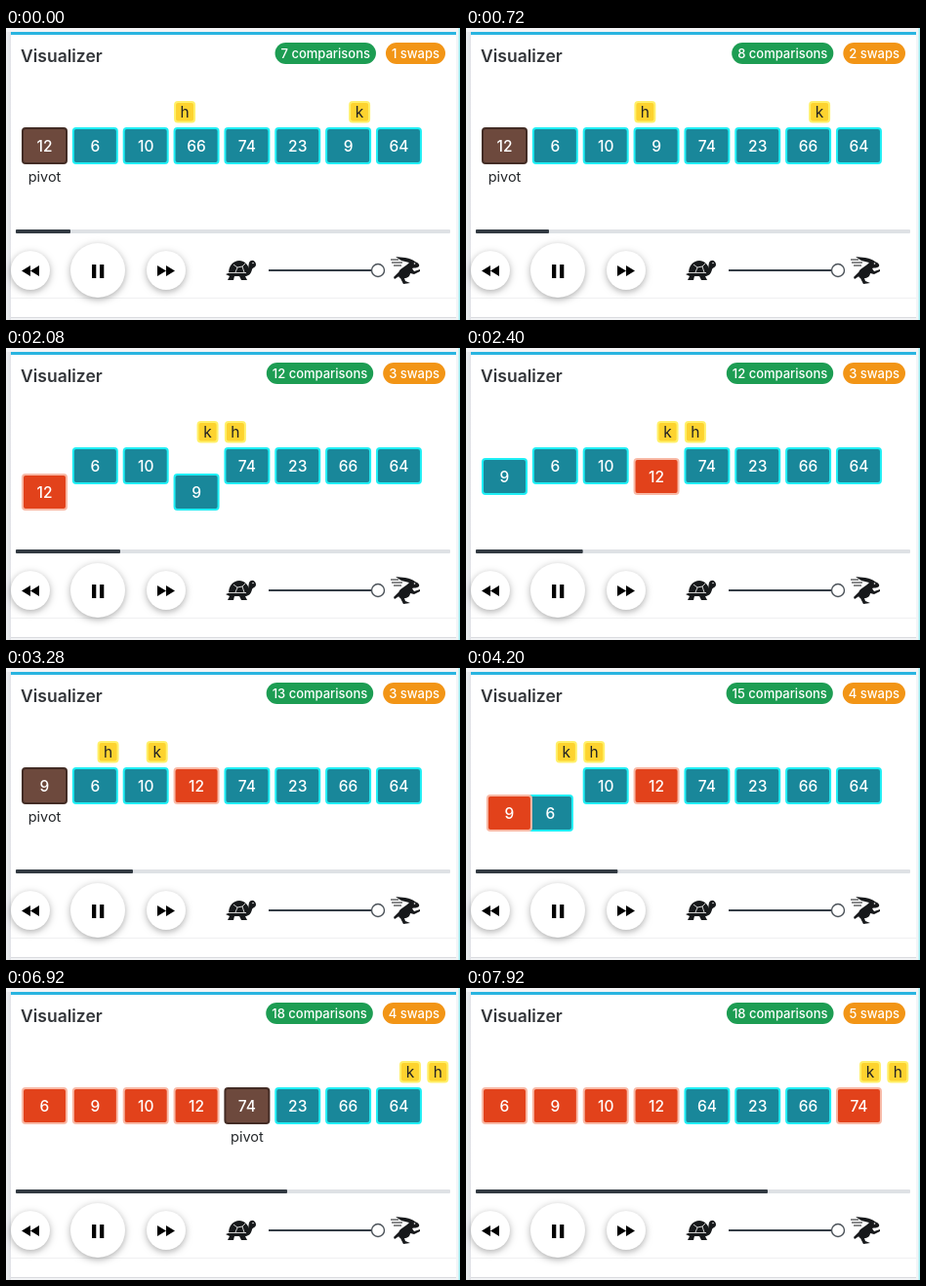
These frames come from a looping animation (465 by 300 pixels, 8000 ms). An HTML page with a canvas:

```html
<!DOCTYPE html>
<html lang="en">
<head>
<meta charset="utf-8">
<title>Quicksort visualizer</title>
<style>
  html, body { margin: 0; width: 100%; height: 100%; overflow: hidden; background: #fff; }
  canvas { display: block; width: 465px; height: 300px; }
</style>
</head>
<body>
<canvas id="stage"></canvas>
<script>
const LOOP = 8000, MOVE = 150, LEG = 200, DROP = 28;
const FONT = 'Inter, Roboto, sans-serif';
const canvas = document.getElementById('stage');
const ctx = canvas.getContext('2d');
const ratio = window.devicePixelRatio || 1;
canvas.width = 465 * ratio;
canvas.height = 300 * ratio;

// Sorting run: times in ms
const values = [12, 6, 10, 66, 74, 23, 9, 64];
const swaps = [[30, 3, 6], [1930, 0, 3], [3980, 0, 1], [7000, 4, 7]];
const compares = [718, 960, 1205, 1450, 1695, 3237, 3485, 3730, 6250, 6500, 6750];
const pivots = [[12, 0, 1930], [9, 2990, 3980], [74, 6000, 7000]];
const sortedAt = { 12: 1930, 9: 3980, 6: 4700, 10: 4950, 74: 7000 };
const hTrack = [[0, 3], [718, 4], [2990, 1], [3237, 2], [6000, 5], [6250, 6], [6500, 7], [6750, 8]];
const kTrack = [[0, 6], [1205, 5], [1450, 4], [1695, 3], [2990, 2], [3730, 1], [6000, 7]];
const progress = [[0, 66], [40, 66], [720, 85], [2080, 117], [2800, 123], [3000, 123],
  [3280, 130], [4660, 168], [5480, 193], [6000, 193], [6920, 288], [7660, 302], [7920, 309], [8000, 309]];

const skins = {
  idle: ['#19879a', '#1feff5'],
  pivot: ['#6d493d', '#432c25'],
  sorted: ['#e2421b', '#f8b9a6']
};

const clamp = x => Math.max(0, Math.min(1, x));
const mix = (a, b, p) => a + (b - a) * p;
const slotX = i => 39.5 + 51.85 * i;

// cubic-bezier(.25, .1, .25, 1)
function ease(x) {
  x = clamp(x);
  let lo = 0, hi = 1;
  for (let i = 0; i < 18; i++) {
    const s = (lo + hi) / 2;
    const bx = 0.75 * s * (1 - s) + s * s * s;
    if (bx < x) lo = s; else hi = s;
  }
  return 0.3 * lo * (1 - lo) ** 2 + 3 * lo * lo * (1 - lo) + lo ** 3;
}

function linear(keys, t) {
  const i = Math.max(1, keys.findIndex(k => k[0] >= t));
  const [t0, a] = keys[i - 1], [t1, b] = keys[i];
  return mix(a, b, clamp((t - t0) / (t1 - t0)));
}

function slide(track, t) {
  let i = track.length - 1;
  while (i > 0 && track[i][0] > t) i--;
  const [start, to] = track[i];
  return i ? mix(track[i - 1][1], to, ease((t - start) / MOVE)) : to;
}

function boxesAt(t) {
  const boxes = values.map((value, i) => ({ value, slot: i, drop: 0 }));
  for (const [start, a, b] of swaps) {
    if (t < start) break;
    const left = boxes.find(o => o.slot === a), right = boxes.find(o => o.slot === b);
    const down = ease((t - start) / LEG);
    const across = ease((t - start - LEG) / LEG);
    const up = ease((t - start - 2 * LEG) / LEG);
    left.slot = across > 0.9999 ? b : mix(a, b, across);
    right.slot = across > 0.9999 ? a : mix(b, a, across);
    left.drop = right.drop = DROP * (down - up);
  }
  return boxes;
}

function text(str, x, y, size, weight, color, align = 'center') {
  ctx.font = `${weight} ${size}px ${FONT}`;
  ctx.textAlign = align;
  ctx.fillStyle = color;
  ctx.fillText(str, x, y);
}

function rect(x, y, w, h, color) {
  ctx.fillStyle = color;
  ctx.fillRect(x, y, w, h);
}

function tile(x, y, w, h, r, fill, stroke, line) {
  ctx.beginPath();
  ctx.roundRect(x, y, w, h, r);
  ctx.fillStyle = fill;
  ctx.fill();
  if (!stroke) return;
  ctx.lineWidth = line;
  ctx.strokeStyle = stroke;
  ctx.stroke();
}

function shape(d, color) {
  ctx.fillStyle = color;
  ctx.fill(new Path2D(d));
}

function lines(d, color, width) {
  ctx.strokeStyle = color;
  ctx.lineWidth = width;
  ctx.stroke(new Path2D(d));
}

function badge(str, right, color) {
  ctx.font = `500 13px ${FONT}`;
  const w = ctx.measureText(str).width + 12;
  tile(right - w, 15, w, 22, 11, color);
  text(str, right - w / 2, 31, 13, 500, '#fff');
  return right - w;
}

function button(x, r) {
  ctx.save();
  ctx.shadowColor = 'rgba(0,0,0,.32)';
  ctx.shadowBlur = 7 * ratio;
  ctx.shadowOffsetY = 2 * ratio;
  ctx.beginPath();
  ctx.arc(x, 249, r, 0, 7);
  ctx.fillStyle = '#fff';
  ctx.fill();
  ctx.restore();
}

function drawCard() {
  rect(0, 0, 465, 300, '#f3f4f6');
  const edge = ctx.createLinearGradient(0, 0, 5, 0);
  edge.addColorStop(0, '#eeeff2');
  edge.addColorStop(1, '#dfe1e6');
  rect(0, 4, 5, 296, edge);
  rect(5, 4, 456, 293, '#fff');
  rect(5, 4, 456, 3, '#29b4e0');
  rect(5, 277, 456, 1, '#eff0f1');
  rect(5, 297, 456, 1, '#d9dbdf');
  rect(463.5, 0, 1.5, 300, '#a5f1f5');
  text('Visualizer', 15, 35, 17.5, 600, '#33363a', 'left');
}

function drawTurtle() {
  const ink = '#17191b';
  shape('M228 252C228 244 233 239 239 239C244 239 248 243 249 248L246 252Z', ink);
  shape('M225 253L230 251L246 251C249 249 248 244 249 241C251 237 256 239 256 243C256 246 253 246 252 248C251 253 248 255 245 255L247 259L241 259L239 255L234 255L233 259L227 259L229 255Z', ink);
  lines('M228 251.5H246M233 243L237 246L242 245L245 242M237 246L235 251M242 245L244 251', '#fff', 0.8);
  ctx.beginPath();
  ctx.arc(253, 241.5, 0.7, 0, 7);
  ctx.fillStyle = '#fff';
  ctx.fill();
}

function drawHare() {
  const ink = '#17191b';
  shape('M399 235L409 236C414 237 417 238 419 240C422 241 424 243 423 245C421 247 418 246 416 247L418 250L424 248L424 250L418 253L414 252C414 255 411 257 408 257L409 260L414 262L407 263L404 257C401 256 401 251 404 248L411 243L413 241L405 239Z', ink);
  shape('M402 251L397 256L398 258L404 254Z', ink);
  lines('M394 238H402M395 241H406M397 244H405', ink, 1.2);
  ctx.beginPath();
  ctx.arc(418.5, 242, 0.8, 0, 7);
  ctx.fillStyle = '#fff';
  ctx.fill();
}

function drawControls(t) {
  tile(10, 207, 445, 4, 1, '#dee1e5');
  tile(10, 207, linear(progress, t) - 10, 4, 1, '#323a42');
  button(25, 20);
  button(94, 28);
  button(164, 20);
  shape('M25 244V255L16 249.5ZM34 244V255L25 249.5Z', '#000');
  shape('M155 244V255L164 249.5ZM164 244V255L173 249.5Z', '#000');
  shape('M88 243H92.3V257H88ZM96 243H100.3V257H96Z', '#000');
  drawTurtle();
  rect(269, 248, 106, 2, '#343d46');
  ctx.beginPath();
  ctx.arc(381, 249, 6.5, 0, 7);
  ctx.fillStyle = '#fff';
  ctx.fill();
  ctx.lineWidth = 1.4;
  ctx.strokeStyle = '#4b5259';
  ctx.stroke();
  drawHare();
}

function drawPointer(name, x) {
  tile(x - 10, 76, 20, 20.5, 3, '#fdd32f', '#fff06a', 2);
  text(name, x, 92, 15.5, 400, '#202124');
}

function drawBoxes(t) {
  const pivot = pivots.find(p => t >= p[1] && t < p[2]);
  for (const { value, slot, drop } of boxesAt(t)) {
    const x = slotX(slot), y = 121 + drop;
    const isPivot = pivot && pivot[0] === value;
    const state = isPivot ? 'pivot' : t >= sortedAt[value] ? 'sorted' : 'idle';
    const [fill, border] = skins[state];
    tile(x - 22.5, y - 18, 45, 36, 3, fill, border, 2);
    text(value, x, y + 6, 15.5, 500, '#fff');
    if (isPivot) text('pivot', x, 158, 14.5, 400, '#25282b');
  }
}

function draw(t) {
  ctx.setTransform(ratio, 0, 0, ratio, 0, 0);
  drawCard();
  const swapCount = 1 + swaps.filter(s => s[0] <= t).length;
  const compareCount = 7 + compares.filter(c => c <= t).length;
  const left = badge(`${swapCount} swaps`, 450, '#f29516');
  badge(`${compareCount} comparisons`, left - 10, '#1d9d53');
  drawBoxes(t);
  drawPointer('h', slotX(slide(hTrack, t)) - 12);
  drawPointer('k', slotX(slide(kTrack, t)) + 11.5);
  drawControls(t);
}

let began;
function frame(now) {
  began ??= now;
  draw((now - began) % LOOP);
  requestAnimationFrame(frame);
}
draw(0);
requestAnimationFrame(frame);
</script>
</body>
</html>
```
